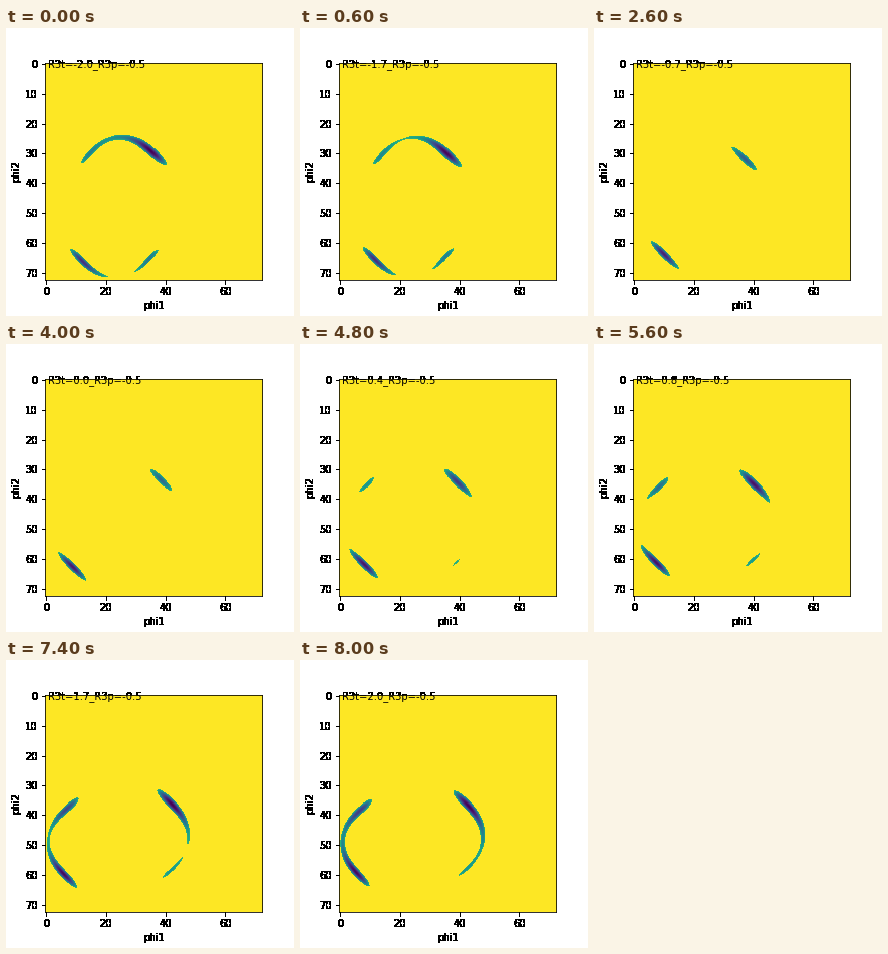
Recreate the animation shown at these times as a matplotlib script. Size 288x288 px, loop 8200 ms.

```python
import numpy as np
import matplotlib.pyplot as plt
from matplotlib.animation import FuncAnimation

N = 73          # phase steps per side
RES = 217       # samples per side
FRAMES = 41     # R3t runs from -2.0 to 2.0
INTERVAL = 200
CUTOFF = 0.75   # larger values are drawn as the plain background

plt.rcParams.update({"font.family": "DejaVu Sans", "font.size": 10})

# Polar coordinates around the middle of the ring, y upwards
axis = (np.arange(RES) + 0.5) * N / RES - 0.5
x, y = np.meshgrid(axis - 23.7, 48.3 - axis)
r = np.hypot(x, y)
theta = np.arctan2(y, x)
cos1, sin1 = np.cos(theta), np.sin(theta)
cos2, sin2 = np.cos(2 * theta), np.sin(2 * theta)
cos4 = np.cos(4 * theta)


def field(t):
    """Misfit along a ring with four minima that slide with t."""
    ring = 21.8 + 1.6 * cos4 + 0.5 * sin2 + 0.12 * t**2 * (sin2 + cos1)
    across = (r - ring) / (1.6 * (1 + 0.12 * sin1))
    along = (cos2 - 0.24 * t) / 0.72

    # Offsets that fade single minima in and out
    bump = np.exp(-((t + 0.3) / 0.75)**2)
    upper_right = 0.45 * bump * np.maximum(sin2, 0) * (sin1 > 0)
    off_diagonal = (0.45 + 0.4 * bump + 0.13 * t * cos1) * np.maximum(-sin2, 0)
    bottom = 0.3 * np.maximum(-sin1, 0)**4

    misfit = across**2 + along**2 + upper_right + off_diagonal + bottom
    return np.where(misfit < CUTOFF, 0.88 * misfit, 1)


def harden(img, dpi):
    """Turn every touched pixel solid black."""
    solid = np.zeros_like(img)
    solid[..., 3] = img[..., 3] > 0
    return solid, 0, 0


fig, ax = plt.subplots(figsize=(4, 4), dpi=72, facecolor="white")
fig.subplots_adjust(left=0.125, right=0.9, bottom=0.125, top=0.88)

image = ax.imshow(field(-2), cmap="viridis", vmin=0, vmax=1,
                  interpolation="nearest",
                  extent=(-0.5, N - 0.5, N - 0.5, -0.5))
ax.set(xticks=range(0, N, 20), yticks=range(0, N, 10),
       xlabel="phi1", ylabel="phi2")
for part in (ax.xaxis, ax.yaxis):
    part.set_agg_filter(harden)

# Solid caption behind the image, smooth one in front
captions = [ax.text(0.5, 1.01, "", zorder=z) for z in (-1, 3)]
captions[0].set_agg_filter(harden)


def update(i):
    t = (i - 20) / 10
    image.set_data(field(t))
    for caption in captions:
        caption.set_text(f"R3t={t:.1f}_R3p=-0.5")
    return image, *captions


anim = FuncAnimation(fig, update, frames=FRAMES, interval=INTERVAL,
                     repeat=True, repeat_delay=0, blit=False)
plt.show()
```
